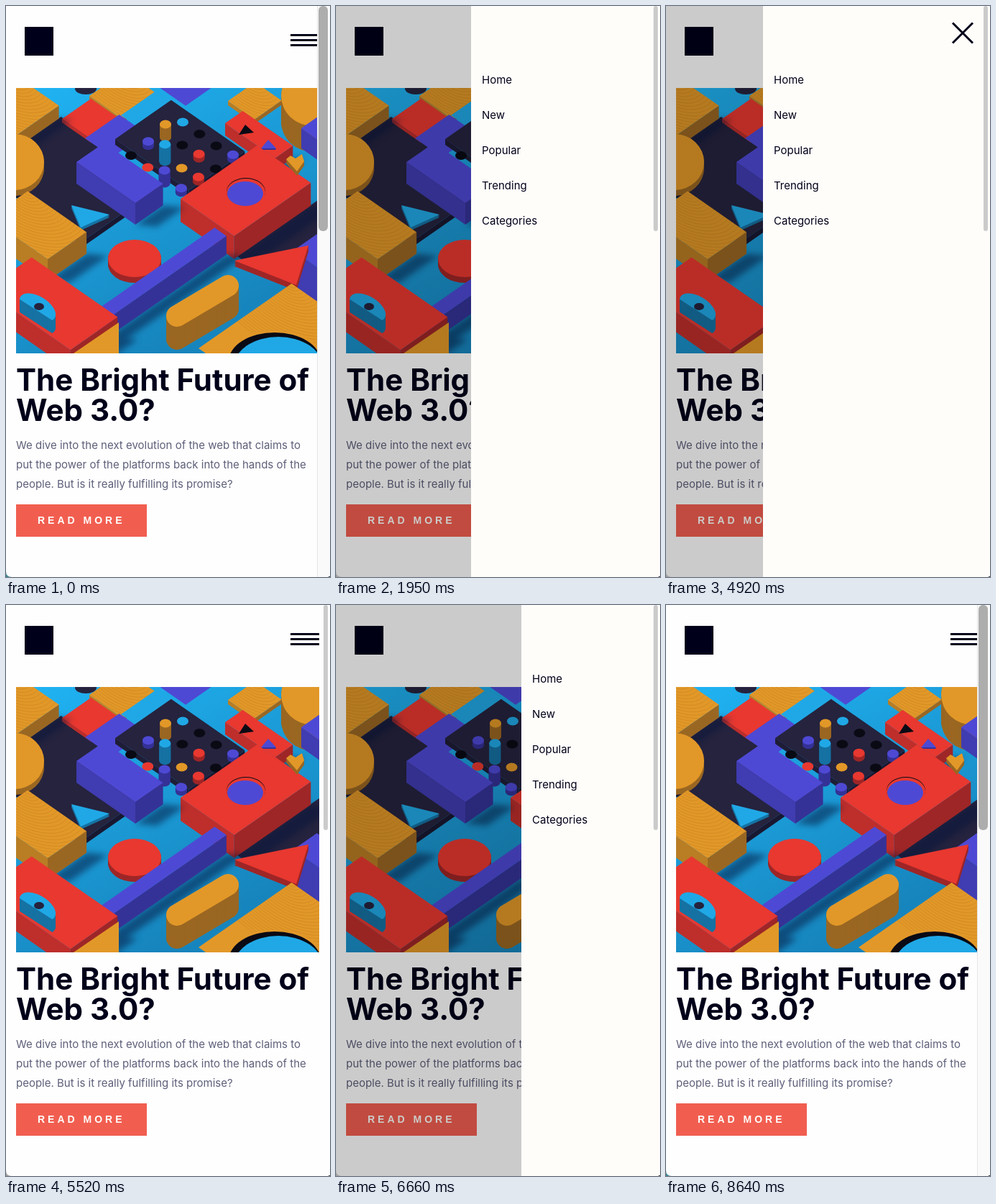
Animation of 451x794 px, one loop 8.7 s. Source, as an HTML page with a canvas:

```html
<!DOCTYPE html>
<html lang="en">
<head>
<meta charset="utf-8">
<title>News page menu</title>
<style>
  html, body { margin: 0; width: 100%; height: 100%; overflow: hidden; background: #fefefe; }
  #stage { position: absolute; left: 0; top: 0; width: 451px; height: 794px; overflow: hidden;
    background: #fefefe; font-family: Inter, sans-serif; font-optical-sizing: none; color: #00001a; }
  #stage * { position: absolute; margin: 0; white-space: nowrap; }
  #stage br { position: static; }
  #logo { left: 26px; top: 29px; width: 40px; height: 40px; background: #00001a; }
  #burger { left: 396px; top: 39px; width: 40px; height: 17px; }
  #burger i { left: 0; width: 40px; height: 3px; background: currentColor; }
  #art { left: 14px; top: 114px; }
  h1 { left: 14px; top: 499px; font-size: 42px; line-height: 42px; font-weight: 700; }
  #text { left: 14px; top: 597px; font-size: 15px; line-height: 27px; color: #5d5f79; }
  #more { left: 14px; top: 693px; width: 152px; height: 45px; padding-left: 30px; background: #f15e50;
    color: #fffdfa; font: bold 14px/45px "Liberation Sans", Arial, sans-serif; letter-spacing: 4px; }
  #shade { inset: 0; background: rgba(0, 0, 0, .2); }
  #menu { left: 0; top: 0; width: 316px; height: 794px; background: #fffdfa; }
  #menu a { left: 15px; font-size: 15px; line-height: 27px; }
  #close { left: 262px; top: 21px; }
  #track { left: 433px; top: 0; width: 17px; height: 794px; background: #fafafa; border-left: 1px solid #e4e4e4; }
  #thumb { top: 0; height: 313px; border-radius: 6px; }
  #corner { left: 0; top: 786px; }
  #dot { left: 449px; top: 793px; width: 2px; height: 1px; background: #444; }
</style>
</head>
<body>
<div id="stage">
  <div id="logo"></div>
  <div id="burger"><i style="top:0"></i><i style="top:7px"></i><i style="top:14px"></i></div>
  <canvas id="art" width="422" height="369"></canvas>
  <h1>The Bright Future of<br>Web 3.0?</h1>
  <p id="text">We dive into the next evolution of the web that claims to<br>put the power of the platforms back into the hands of the<br>people. But is it really fulfilling its promise?</p>
  <div id="more">READ MORE</div>
  <div id="shade"></div>
  <div id="menu">
    <svg id="close" width="32" height="33"><path d="M2 2.5 30 30.5M30 2.5 2 30.5" stroke="currentColor" stroke-width="3" fill="none"/></svg>
  </div>
  <div id="track"></div>
  <div id="thumb"></div>
  <svg id="corner" width="8" height="8"><path d="M0 0Q0 8 8 8H0Z" fill="currentColor"/></svg>
  <div id="dot"></div>
</div>
<script>
const LOOP = 8700;
const DARK = [0, 0, 26], RED = [241, 94, 80];
const $ = id => document.getElementById(id);
const clamp = v => Math.min(1, Math.max(0, v));
const ramp = (t, a, b) => clamp((t - a) / (b - a));
const mix = (a, b, k) => `rgb(${a.map((v, i) => Math.round(v + (b[i] - v) * k))})`;
const within = (t, a, b) => t >= a && t < b;

// ---- block illustration: one oblique view, every block lies on the same two axes ----
const c = $('art').getContext('2d');
c.translate(-14, -114);

const PAINT = {
  orange: [226, 152, 40], red: [232, 56, 48], purple: [78, 73, 212],
  cyan: [32, 168, 230], navy: [37, 35, 62], black: [10, 10, 20]
};
const tone = (name, k) => mix([0, 0, 20], PAINT[name], k);
const at = (x, y, u, v) => [x + .82 * (u + v), y + .57 * (u - v)];

function poly(...pts) {
  c.beginPath();
  pts.forEach(p => c.lineTo(...p));
  c.closePath();
}
function fill(style) {
  c.fillStyle = style;
  c.fill();
}
// wood rings inside the current path
function grain(x, y) {
  c.save();
  c.clip();
  c.strokeStyle = 'rgba(110,60,0,.13)';
  for (let r = 8; r < 150; r += 6) {
    c.beginPath();
    c.ellipse(x, y, r, r * .6, .6, 0, 7);
    c.stroke();
  }
  c.restore();
}
// left corner of the top face, lengths along both axes, height
function block(name, x, y, u, v, h = 0) {
  const a = [x, y], b = at(x, y, u, 0), d = at(x, y, u, v), e = at(x, y, 0, v);
  const down = p => [p[0], p[1] + h];
  const cast = p => [p[0] + h, p[1] + h * 1.1];
  if (h > 10) {
    c.save();
    c.filter = 'blur(4px)';
    poly(down(b), cast(b), cast(d), down(d));
    fill('rgba(5,20,60,.5)');
    c.restore();
  }
  poly(a, b, down(b), down(a));
  fill(tone(name, .82));
  poly(b, d, down(d), down(b));
  fill(tone(name, .68));
  poly(a, b, d, e);
  fill(tone(name, 1));
  if (name === 'orange') grain(...e);
}
// any path pulled down by h pixels
function solid(name, h, path) {
  for (let i = h; i >= 0; i--) {
    c.save();
    c.translate(0, i);
    path();
    c.restore();
    fill(tone(name, i ? .68 : 1));
  }
}
const disc = (name, x, y, rx, ry, h = 0) => solid(name, h, () => {
  c.beginPath();
  c.ellipse(x, y, rx, ry, 0, 0, 7);
});
const wedge = (name, h, ...pts) => solid(name, h, () => poly(...pts));

// four by four board: letter = colour, digit = peg height in steps
function board(x, y) {
  block('navy', x, y, 125, 95, 8);
  const pegs = 'n0r0p3p1p1b4o0r1o3n0r1n0b0n0n0p1';
  const names = { n: 'black', r: 'red', p: 'purple', b: 'cyan', o: 'orange' };
  for (let row = 3; row >= 0; row--) {
    for (let k = 0; k < 4; k++) {
      const i = 2 * (row * 4 + k), h = pegs[i + 1] * 6;
      disc(names[pegs[i]], x + 22 + 24 * row + 23.3 * k, y + 23 - 15.5 * row + 16.5 * k - h * .7, 8, 6, h);
    }
  }
}

function drawArt() {
  const floor = c.createLinearGradient(14, 114, 200, 483);
  floor.addColorStop(0, '#20b4f4');
  floor.addColorStop(1, '#1785bd');
  c.fillStyle = floor;
  c.fillRect(14, 114, 422, 369);

  // flat tiles
  disc('navy', 111, 115, 15, 8);
  block('purple', 200, 104, 61, 64);
  block('orange', 116, 125, 56, 60, 5);
  block('cyan', 160, 152, 48, 62);
  block('navy', -30, 228, 170, 130, 8);
  block('red', 78, 157, 49, 49, 5);
  block('purple', 110, 184, 46, 58);

  // left and top
  block('orange', -74, 150, 80, 100, 18);
  disc('orange', 12, 217, 41, 39, 8);
  board(152, 185);
  block('orange', 309, 132, 45, 46, 6);
  disc('orange', 428, 125, 45, 42, 36);
  block('purple', 411, 170, 60, 40, 28);
  block('red', 305, 163, 85, 30, 17);
  wedge('black', 0, [333, 165], [345, 176], [324, 179]);
  wedge('purple', 2, [365, 186], [376, 198], [355, 198]);

  // middle
  block('navy', 322, 348, 55, 140);
  block('red', 243, 268, 91, 130, 32);
  disc('black', 334, 258, 27, 19);
  disc('red', 334, 259, 27, 19);
  disc('purple', 333, 261, 25, 17);
  wedge('orange', 6, [390, 213], [396, 208], [403, 212], [412, 206], [415, 216], [405, 230]);
  block('purple', 98, 217, 100, 47, 30);
  wedge('cyan', 4, [91, 277], [144, 290], [104, 308]);
  block('orange', -24, 295, 100, 66, 30);
  disc('red', 179, 351, 37, 26, 8);

  // bottom
  block('purple', 124, 424, 20, 203, 26);
  block('red', -30, 395, 146, 80, 28);
  solid('cyan', 18, () => {
    c.beginPath();
    c.ellipse(44, 419, 28, 15, .55, 2.9, 6.6);
    c.closePath();
  });
  disc('navy', 46, 418, 7, 5);
  wedge('orange', 0, [157, 440], [157, 483], [94, 483]);
  solid('orange', 32, () => {
    c.beginPath();
    c.arc(309, 389, 15, -2.2, .95);
    c.arc(238, 431, 15, .95, 4.1);
    c.closePath();
  });
  block('purple', 400, 340, 60, 40, 60);
  wedge('red', 8, [318, 354], [421, 333], [404, 388]);
  block('orange', 268, 476, 200, 158);
  disc('orange', 373, 490, 68, 38);
  disc('black', 374, 494, 64, 40);
  disc('cyan', 379, 502, 62, 42);
}
drawArt();

// ---- menu ----
// label, moment fully highlighted, moment back to normal
const LINKS = [
  ['Home', 3150, 3390], ['New', 3630, 3810], ['Popular', 3930, 4200],
  ['Trending', 4320, 4530], ['Categories', 4710, 4920]
];
const links = LINKS.map(([label, on, off], i) => {
  const el = document.createElement('a');
  el.textContent = label;
  el.style.top = 89 + 49 * i + 'px';
  $('menu').append(el);
  return { el, on, off };
});

// cubic-bezier(.42, 0, .58, 1)
function easeInOut(x) {
  let lo = 0, hi = 1, s = .5;
  for (let i = 0; i < 20; i++) {
    s = (lo + hi) / 2;
    const bx = 3 * s * (1 - s) * (1 - s) * .42 + 3 * s * s * (1 - s) * .58 + s * s * s;
    if (bx < x) lo = s; else hi = s;
  }
  return s * s * (3 - 2 * s);
}

function render(t) {
  const open = within(t, 1710, 5520) ? 1710 : within(t, 6480, 7890) ? 6480 : 0;
  $('shade').style.display = $('menu').style.display = open ? 'block' : 'none';
  if (open) {
    const x = 450 - 315 * easeInOut(clamp((t - open + 45) / 400));
    $('menu').style.transform = `translateX(${Math.round(x)}px)`;
  }
  const hot = within(t, 1440, 1710) || within(t, 6060, 6480) || within(t, 7890, 8040);
  $('burger').style.color = mix(DARK, RED, hot ? 1 : 0);
  $('close').style.color = mix(DARK, RED, t >= 6870 ? 1 : 0);
  for (const { el, on, off } of links) {
    el.style.color = mix(DARK, RED, ramp(t, on - 75, on) - ramp(t, off - 60, off));
  }

  const wide = 1 - ramp(t, 450, 660) + ramp(t, 8190, 8460);
  const left = 442 - 7 * wide;
  $('track').style.opacity = wide;
  $('thumb').style.left = left + 'px';
  $('thumb').style.width = 448 - left + 'px';
  $('thumb').style.background = mix([203, 203, 203], [173, 173, 173], wide);
  $('corner').style.color = within(t, 1620, 8640) ? '#a0a0a0' : '#3f8794';
}

function tick() {
  render(performance.now() % LOOP);
  requestAnimationFrame(tick);
}
tick();
</script>
</body>
</html>
```
